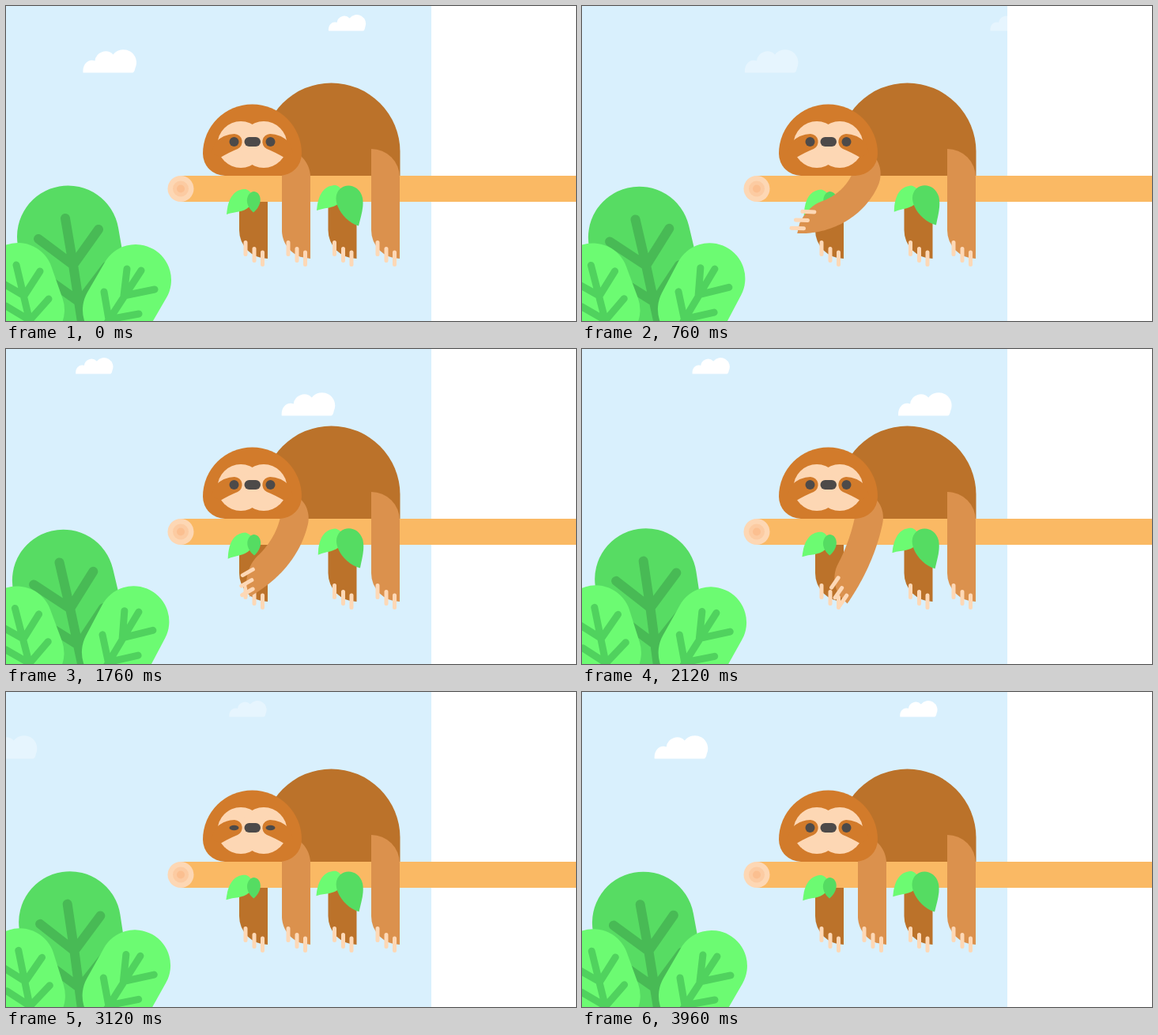
These frames come from a looping animation (721 px wide and 399 px high, 4 s). An HTML page:

```html
<!DOCTYPE html>
<html lang="en">
<head>
<meta charset="utf-8">
<title>Sloth on a branch</title>
<style>
  html, body { margin: 0; width: 100%; height: 100%; overflow: hidden; background: #fff; }
  svg { display: block; }
  .vein { fill: none; stroke: #50d25e; stroke-width: 9; stroke-linecap: round; stroke-linejoin: round; }
  .blade { stroke: #6cfb72; stroke-width: 90; stroke-linecap: round; }
  .claws { fill: none; stroke: #fdd8b6; stroke-width: 5; stroke-linecap: round; }
  .far .claws { stroke: #e6c28f; }
  .far { fill: #bb722a; }
  .near { fill: #db914d; }
</style>
</head>
<body>
<svg width="721" height="399" viewBox="0 0 721 399">
  <defs>
    <clipPath id="skyClip"><rect width="538" height="399"/></clipPath>
    <path id="cloud" fill="#fff" d="M0 0C-1-10 6-18 15-15A13.5 13.5 0 0 1 38-23A16.5 16.5 0 0 1 66-6Q65 0 62 0Z"/>
    <path id="claws" d="M-10-20.5V-5.500M1-12.500V2.500M11.500-8V7.500"/>
    <g id="limb">
      <path d="M349 181A36 36 0 0 1 385 217V320A36 36 0 0 1 349 284Z"/>
      <use href="#claws" class="claws" x="367" y="320"/>
    </g>
    <path id="leaf" fill="#6cfb72" d="M279 264C281 241 290 232 303 232C312 235 315 244 308 254C300 262 289 260 279 264Z"/>
    <g id="halfFace">
      <circle cx="297" cy="175.500" r="29.500" fill="#fdd7b4"/>
    </g>
    <path id="eyePatch" fill="#d27b2b" d="M264 173Q276 162 289 162A10 10 0 0 1 293 181Q283 185 271 192L260 186Z"/>
  </defs>

  <rect width="538" height="399" fill="#d9f0fd"/>
  <g id="clouds" clip-path="url(#skyClip)"></g>

  <g class="far">
    <use href="#limb" x="-54"/>
    <use href="#limb" x="58.500"/>
  </g>
  <path fill="#bb722a" d="M324.500 215V184.500A87 87 0 0 1 498.500 184.500V215Z"/>
  <rect x="221" y="215" width="500" height="33" fill="#fab964"/>
  <circle cx="221" cy="231.500" r="16.500" fill="#fdd7b4"/>
  <circle cx="221" cy="231.500" r="10" fill="#fccba2"/>
  <circle cx="221" cy="231.500" r="5" fill="#fbbf90"/>
  <use href="#limb" x="113" class="near"/>

  <g data-delay="170" data-pivot="310 237"><use href="#leaf"/></g>
  <path data-delay="0" data-pivot="314 236" fill="#55dc62" d="M313 261.500C306 256 303 247 306 241C308 236 312 235 314 235C321 236 323 244 321 250C319 256 316 259 313 261.500Z"/>
  <g data-delay="170" data-pivot="424 231"><use href="#leaf" x="114" y="-5"/></g>
  <path data-delay="0" data-pivot="422 233" fill="#55dc62" d="M446 278.500C430 274 417 256 417.500 243C419 223 446 222 451 243C453 255 449 266 446 278.500Z"/>

  <g class="near">
    <path id="arm"/>
    <use id="hand" href="#claws" class="claws"/>
  </g>

  <path fill="#d27b2b" d="M249 187A62.500 62.500 0 0 1 374 187A28 28 0 0 1 346 215H277A28 28 0 0 1 249 187Z"/>
  <use href="#halfFace"/>
  <use href="#halfFace" transform="matrix(-1 0 0 1 623 0)"/>
  <use href="#eyePatch"/>
  <use href="#eyePatch" transform="matrix(-1 0 0 1 623 0)"/>
  <g fill="#4d4a49">
    <ellipse class="eye" cx="288.500" cy="172" rx="6" ry="6"/>
    <ellipse class="eye" cx="334.500" cy="172" rx="6" ry="6"/>
    <rect x="301.500" y="166" width="20.500" height="12" rx="6"/>
  </g>

  <g data-delay="170" data-pivot="95 394">
    <path d="M78.500 292L106 450" fill="none" stroke="#57dc63" stroke-width="129" stroke-linecap="round"/>
    <path class="vein" style="stroke:#48ba55;stroke-width:12" d="M75 269L85 328L99 420M41 295L85 328L117 283M51 345L93 375L127 330"/>
  </g>
  <g data-delay="330" data-pivot="35 412">
    <path class="blade" d="M15 345L29 385"/>
    <path class="vein" d="M13 328L32 408M-8 349L23 367L43 336M0 380L30 398L54 371"/>
  </g>
  <g data-delay="-10" data-pivot="120 412">
    <path class="blade" d="M164 347L142 385"/>
    <path class="vein" d="M171 335L126 404M153 333L149 367L188 359M124 362L130 397L168 390"/>
  </g>
</svg>
<script>
const LOOP = 4000, SWAY = 1000, CLOUD_SPAN = 571;
const $ = id => document.getElementById(id);

// Arm spine as a cubic Bezier (x0 y0 x1 y1 x2 y2 x3 y3), keyed by time.
const rest = [367, 181, 367, 227, 367, 274, 367, 320];
const armKeys = [
  [0, rest],
  [120, rest],
  [760, [365, 181, 368, 238, 320, 272, 273, 270]],
  [1200, [360, 181, 352, 258, 292, 245.5, 250.5, 228]],
  [1760, [367, 181, 371, 232, 345, 272, 299.5, 298]],
  [2520, [367, 181, 358.5, 227, 350, 274, 341.5, 319.5]],
  [3000, rest],
  [LOOP, rest]
];

const clouds = [[97.5, 84.5, 1], [408, 31.5, .7]].flatMap(([x, y, scale]) =>
  [0, -CLOUD_SPAN].map(shift => {
    const el = document.createElementNS("http://www.w3.org/2000/svg", "use");
    el.setAttribute("href", "#cloud");
    $("clouds").append(el);
    return { el, x, y, scale, shift };
  }));
const leaves = [...document.querySelectorAll("[data-delay]")];
const eyes = document.querySelectorAll(".eye");

// Smooth interpolation through the keys that never overshoots them.
function armPose(t) {
  let i = 0;
  while (i < armKeys.length - 2 && t >= armKeys[i + 1][0]) i++;
  const [t0, from] = armKeys[i], [t1, to] = armKeys[i + 1];
  const span = t1 - t0, u = (t - t0) / span;
  const slope = (k, c) => k < 0 || k > armKeys.length - 2 ? 0 :
    (armKeys[k + 1][1][c] - armKeys[k][1][c]) / (armKeys[k + 1][0] - armKeys[k][0]);
  const tangent = (k, c) => {
    const a = slope(k - 1, c), b = slope(k, c);
    return a * b > 0 ? 2 * a * b / (a + b) : 0;
  };
  return from.map((p, c) => {
    const blend = u * u * (3 - 2 * u);
    return p + (to[c] - p) * blend +
      span * u * (1 - u) * ((1 - u) * tangent(i, c) - u * tangent(i + 1, c));
  });
}

function drawArm(t) {
  const [x0, y0, x1, y1, x2, y2, x3, y3] = armPose(t);
  const length = 139, width = 36, steps = 60, right = [], left = [];
  const corner = d => width * Math.sqrt(1 - Math.max(0, 1 - d / width) ** 2) - width / 2;
  const bez = (a, b, c, d, u, v) => a * v ** 3 + 3 * b * u * v * v + 3 * c * u * u * v + d * u ** 3;
  const der = (a, b, c, d, u, v) => (b - a) * v * v + 2 * (c - b) * u * v + (d - c) * u * u;
  for (let i = 0; i <= steps; i++) {
    const u = i / steps, v = 1 - u;
    const x = bez(x0, x1, x2, x3, u, v), y = bez(y0, y1, y2, y3, u, v);
    const dx = der(x0, x1, x2, x3, u, v), dy = der(y0, y1, y2, y3, u, v);
    const n = Math.hypot(dx, dy);
    const side = w => `${(x + w * dy / n).toFixed(2)} ${(y - w * dx / n).toFixed(2)}`;
    right.push(side(corner(u * length)));
    left.unshift(side(-corner(v * length)));
  }
  $("arm").setAttribute("d", `M${[...right, ...left].join("L")}Z`);
  const turn = Math.atan2(x2 - x3, y3 - y2) * 180 / Math.PI;
  $("hand").setAttribute("transform", `translate(${x3} ${y3}) rotate(${turn})`);
}

function draw(t) {
  const drift = CLOUD_SPAN * t / LOOP;
  for (const { el, x, y, scale, shift } of clouds) {
    const pos = (x + drift) % CLOUD_SPAN + shift;
    el.setAttribute("transform", `translate(${pos} ${y}) scale(${scale})`);
  }
  const faint = (t >= 400 && t < 1480) || (t >= 2800 && t < 3520);
  $("clouds").setAttribute("opacity", faint ? .36 : 1);

  const wave = ms => Math.cos(2 * Math.PI * ms / SWAY);
  for (const leaf of leaves) {
    const { delay, pivot } = leaf.dataset;
    const angle = 2.6 * (wave(t - delay) - wave(delay));
    leaf.setAttribute("transform", `rotate(${angle} ${pivot})`);
  }

  const lid = Math.min(1, .1 + .9 * Math.abs(t - 3165) / 90);
  eyes.forEach(eye => eye.setAttribute("ry", 6 * lid));
  drawArm(t);
}

const start = performance.now();
function tick() {
  const t = (performance.now() - start) % LOOP;
  draw(Math.floor(t / 40) * 40);
  requestAnimationFrame(tick);
}
tick();
</script>
</body>
</html>
```
